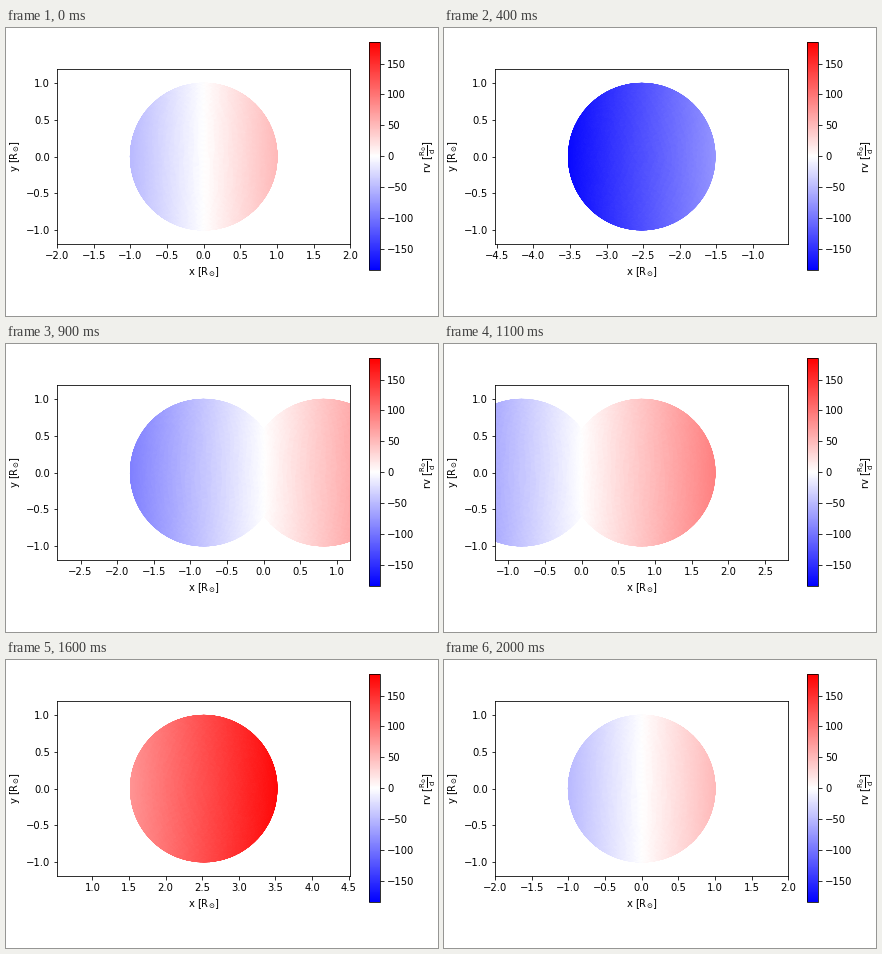
These frames come from a looping animation (432 by 288 pixels, 2100 ms). A matplotlib script:

```python
from itertools import combinations

import matplotlib.pyplot as plt
import numpy as np
from matplotlib.animation import FuncAnimation
from matplotlib.collections import PolyCollection
from matplotlib.ticker import MultipleLocator

W, H, DPI = 432, 288, 72
STEPS = 20                       # steps per orbit; both end phases are shown
ORBIT = 2.65                     # distance of each star from the barycentre
KMS = 2 * np.pi * 695700 / 86400  # solar radii per day (times 2 pi) in km/s
RV_MAX = KMS * (ORBIT + 1)

plt.rcParams.update({"font.family": "DejaVu Sans", "font.size": 10})


def unit(p):
    return p / np.linalg.norm(p, axis=-1, keepdims=True)


def sphere_mesh(levels):
    """Triangles of a slightly irregular unit sphere, shape (n, 3, 3)."""
    phi = (1 + 5 ** 0.5) / 2
    pts = [np.roll((0, a, b * phi), k)
           for k in range(3) for a in (-1, 1) for b in (-1, 1)]
    tris = unit(np.array([
        t for t in combinations(pts, 3)
        if all(np.linalg.norm(p - q) < 2.1 for p, q in combinations(t, 2))]))
    for _ in range(levels):
        a, b, c = tris.transpose(1, 0, 2)
        ab, bc, ca = unit(a + b), unit(b + c), unit(c + a)
        tris = np.concatenate([np.stack(t, axis=1) for t in
                               ((a, ab, ca), (b, bc, ab), (c, ca, bc), (ab, bc, ca))])
    return unit(tris + 0.012 * np.sin(97 * tris[..., [1, 2, 0]]))


def rotate(p, angle):
    """Turn points about the vertical axis."""
    x, y, z = np.moveaxis(p, -1, 0)
    c, s = np.cos(angle), np.sin(angle)
    return np.stack([x * c + z * s, y, z * c - x * s], axis=-1)


def px_box(left, top, right, bottom):
    return [left / W, 1 - bottom / H, (right - left) / W, (bottom - top) / H]


ball = sphere_mesh(4)
offset = np.array([0, 0, ORBIT])
system = np.concatenate([ball - offset, ball + offset])
normals = np.concatenate([ball, ball]).mean(axis=1)

fig = plt.figure(figsize=(W / DPI, H / DPI), dpi=DPI, facecolor="white")
ax = fig.add_axes(px_box(51.2, 41.3, 344.2, 215.9))
ax.set_ylim(-1.192, 1.192)
ax.set_xlabel(r"x [$\mathrm{R_{\odot}}$]")
ax.set_ylabel(r"y [$\mathrm{R_{\odot}}$]")
ax.xaxis.set_major_locator(MultipleLocator(0.5))
ax.yaxis.set_major_locator(MultipleLocator(0.5))

stars = PolyCollection([], cmap="bwr", edgecolors="face", linewidths=1)
stars.set_clim(-RV_MAX, RV_MAX)
ax.add_collection(stars, autolim=False)

cax = fig.add_axes(px_box(362.8, 14.2, 374.2, 242.2))
bar = fig.colorbar(stars, cax=cax, ticks=MultipleLocator(50))
bar.set_label(r"rv [$\mathrm{\frac{R_{\odot}}{d}}$]")


def draw(i):
    angle = 2 * np.pi * i / STEPS
    front = rotate(normals, angle)[:, 2] > -0.1
    tris = rotate(system[front], angle)
    tris = tris[np.argsort(tris[..., 2].mean(axis=1))]
    stars.set_verts(tris[..., :2])
    # synchronous rotation: velocity along the line of sight follows x
    stars.set_array(KMS * tris[..., 0].mean(axis=1))
    centre = round(-ORBIT * np.sin(angle), 9)
    ax.set_xlim(centre - 2, centre + 2)
    return [stars]


anim = FuncAnimation(fig, draw, frames=STEPS + 1, interval=100,
                     init_func=lambda: draw(0), repeat=True, repeat_delay=0)
plt.show()
```
